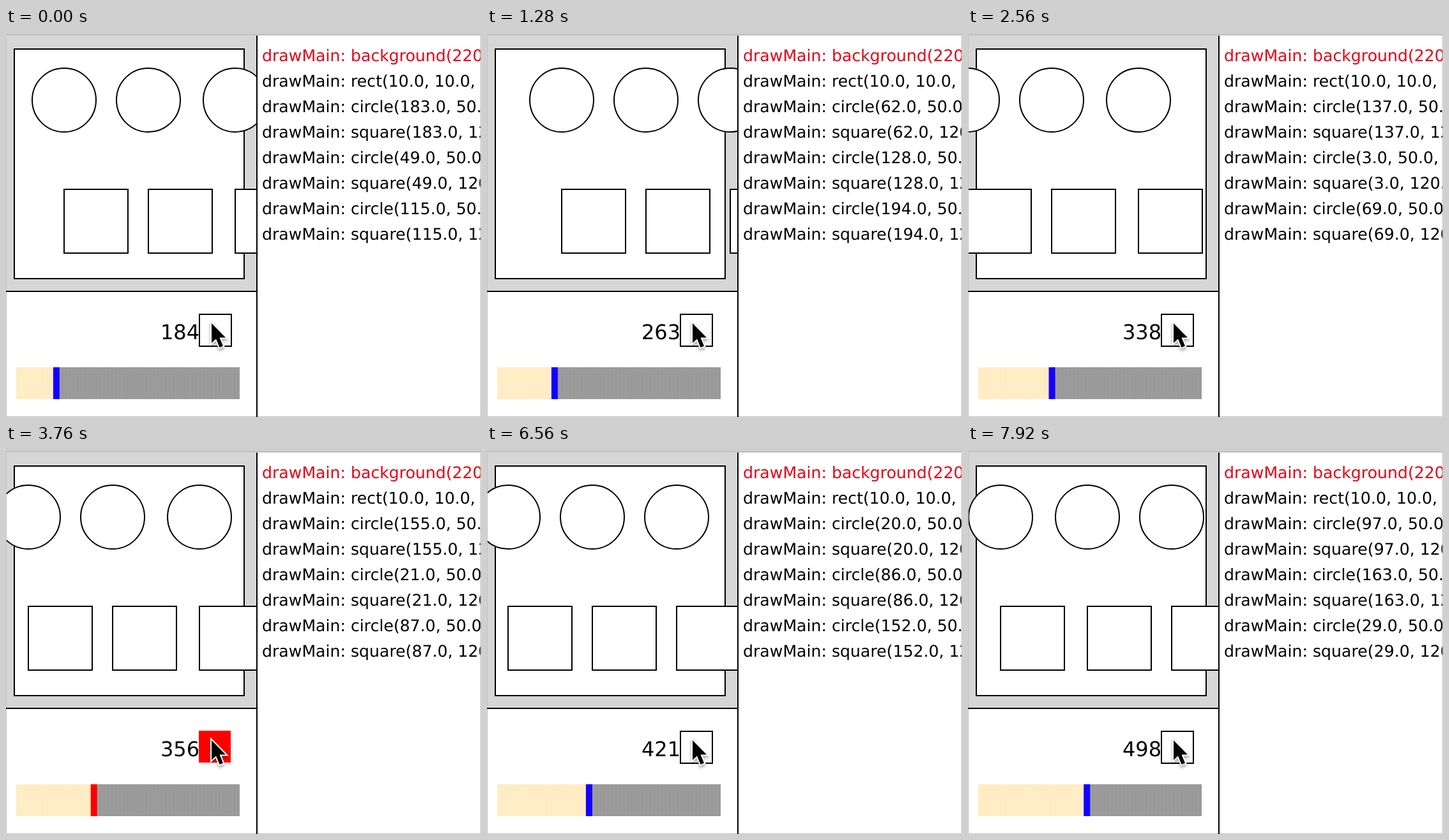
An HTML page that plays this animation: 744x610 px, repeating every 8 s.

```html
<!DOCTYPE html>
<html lang="en">
<head>
<meta charset="utf-8">
<title>Draw call log</title>
<style>
  html, body { margin: 0; width: 100%; height: 100%; overflow: hidden; background: #fff; }
  svg { display: block; width: 744px; height: 610px; }
  text { font-family: "DejaVu Sans", sans-serif; text-rendering: geometricPrecision; white-space: pre; }
  #log { font-size: 25.2px; }
  #count { font-size: 32px; text-anchor: end; }
  .outlined { fill: #fff; stroke: #000; stroke-width: 2; }
  #log text:first-child { fill: #ea0010; }
  #cursor { filter: drop-shadow(0 3px 2px rgba(0, 0, 0, .35)); }
</style>
</head>
<body>
<svg viewBox="0 0 744 610">
  <defs>
    <clipPath id="view"><rect y="12" width="393" height="401"/></clipPath>
    <pattern id="seams" width="6" height="50" patternUnits="userSpaceOnUse">
      <rect width="2" height="50" fill="#fff" opacity=".04"/>
    </pattern>
  </defs>
  <rect width="744" height="610" fill="#fff"/>

  <g clip-path="url(#view)">
    <rect y="12" width="393" height="401" fill="#d6d6d6"/>
    <rect class="outlined" x="13" y="33" width="360" height="360"/>
    <g id="shapes"></g>
  </g>

  <g id="log"></g>

  <rect width="744" height="11" fill="#cfcfcf"/>
  <rect y="10" width="744" height="1.5" fill="#b0b0b0"/>
  <path d="M.5 12V609.5H743.5V12" fill="none" stroke="#c2c2c2"/>
  <path d="M393 12V610M0 413H393" stroke="#000" stroke-width="2"/>

  <text id="count" x="303" y="488"></text>
  <rect id="button"/>
  <rect x="16" y="532" width="350" height="50" fill="#999"/>
  <rect id="played" x="16" y="532" height="50" fill="#ffecc4"/>
  <rect x="16" y="532" width="350" height="50" fill="url(#seams)"/>
  <rect id="handle" y="532" width="10" height="50"/>

  <path id="cursor" d="M322 463V494L329 487.500L334.500 501L340 498.700L334.500 485.500H344Z"
        fill="#000" stroke="#fff" stroke-width="4" paint-order="stroke"/>
</svg>

<script>
const LOOP = 8000, STEP = 80;
const PAUSE = 2860, RESUME = 5490;
// [time in ms, counter value]
const KEYS = [[0, 184], [640, 225], [1920, 300], [PAUSE, 356], [RESUME, 356],
              [5600, 363], [6560, 421], [7920, 498]];

const $ = id => document.getElementById(id);
const set = (el, attrs) => {
  for (const name in attrs) el.setAttribute(name, attrs[name]);
  return el;
};
const add = (parent, tag, attrs) =>
  parent.appendChild(set(document.createElementNS("http://www.w3.org/2000/svg", tag), attrs));

const lines = Array.from({ length: 8 }, (_, i) => add($("log"), "text", { x: 401, y: 52 + 40 * i }));
lines[0].textContent = "drawMain: background(220)";
lines[1].textContent = "drawMain: rect(10.0, 10.0, 180.0, 180.0)";

const pairs = [0, 66, 132].map((offset, i) => ({
  offset,
  circle: add($("shapes"), "circle", { class: "outlined", cy: 113, r: 50 }),
  square: add($("shapes"), "rect", { class: "outlined", y: 253, width: 100, height: 100 }),
  circleLine: lines[2 + 2 * i],
  squareLine: lines[3 + 2 * i]
}));

function counterAt(time) {
  let i = 1;
  while (i < KEYS.length - 1 && time > KEYS[i][0]) i++;
  const [t0, n0] = KEYS[i - 1], [t1, n1] = KEYS[i];
  return Math.round(n0 + (n1 - n0) * (time - t0) / (t1 - t0));
}

function draw(time) {
  const count = counterAt(time);
  const paused = time >= PAUSE && time < RESUME;

  for (const p of pairs) {
    const x = (count - 1 + p.offset) % 200;
    set(p.circle, { cx: 2 * x - 7 });
    set(p.square, { x: 2 * x - 7 });
    p.circleLine.textContent = `drawMain: circle(${x}.0, 50.0, 50.0)`;
    p.squareLine.textContent = `drawMain: square(${x}.0, 120.0, 50.0)`;
  }

  $("count").textContent = count;
  set($("button"), paused
    ? { x: 302, y: 448, width: 50, height: 50, class: "", fill: "#f00" }
    : { x: 303, y: 449, width: 50, height: 50, class: "outlined" });

  const progress = count * 350 / 1024;
  set($("played"), { width: progress });
  set($("handle"), { x: 11 + progress, fill: paused ? "#f00" : "#1500ff" });
}

function tick() {
  const time = performance.now() % LOOP;
  draw(Math.floor(time / STEP) * STEP);
  requestAnimationFrame(tick);
}
tick();
</script>
</body>
</html>
```
